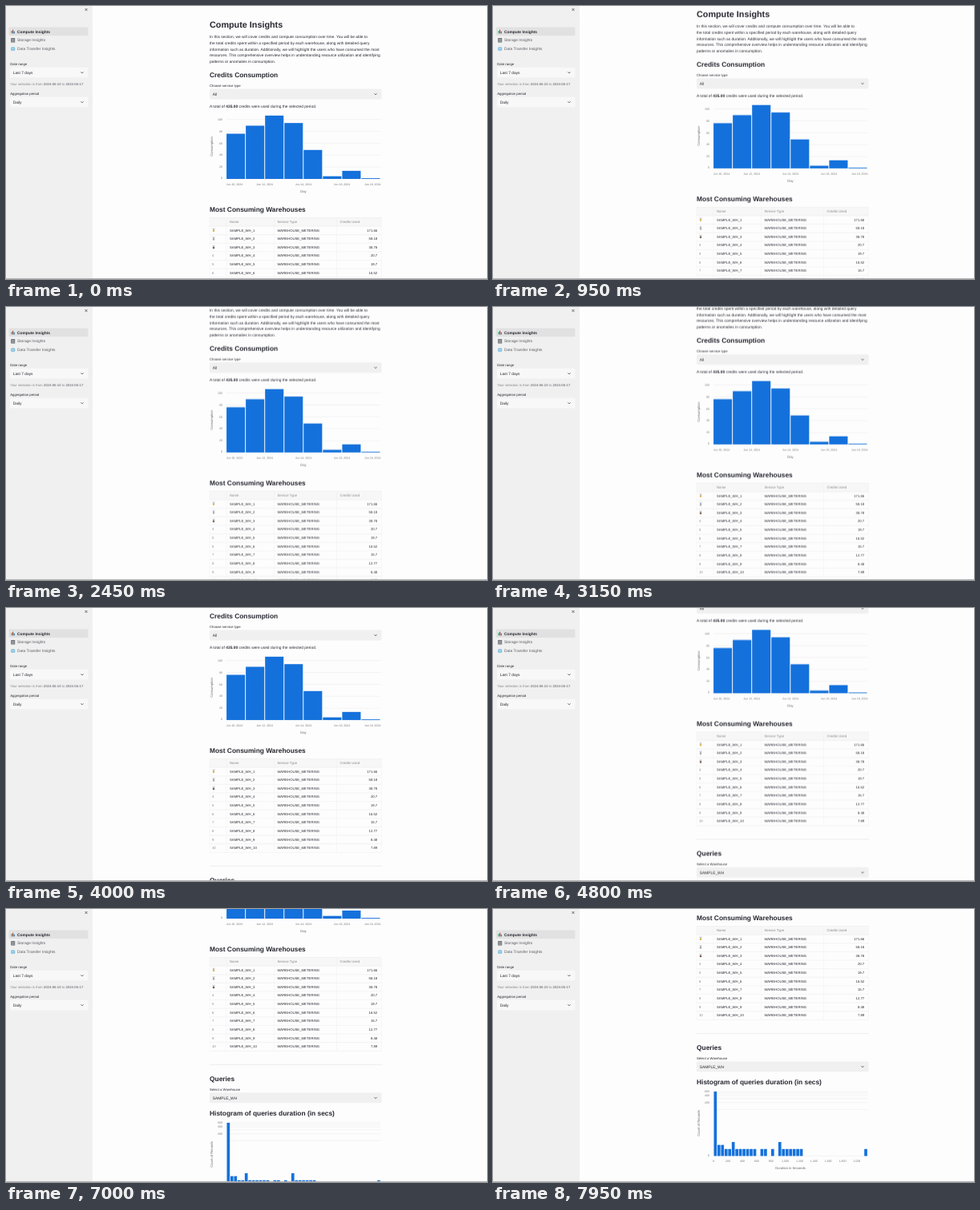
Write an HTML page that moves like this. It is 600 px wide and 341 px high and loops after 8000 ms.

```html
<!DOCTYPE html>
<html lang="en">
<head>
<meta charset="utf-8">
<title>Compute Insights</title>
<style>
  html, body { margin: 0; width: 100%; height: 100%; overflow: hidden; background: #fdfdfd; }
  svg { display: block; width: 600px; height: 341px; }
  text {
    font-family: "Liberation Sans", Arial, sans-serif;
    font-size: 4.86px; fill: #262730; text-rendering: geometricPrecision;
  }
  .h1 { font-size: 10.8px; font-weight: bold; }
  .h2 { font-size: 8.4px; font-weight: bold; }
  .label { font-size: 4.25px; }
  .tick { font-size: 3.55px; fill: #777; }
  .axis { font-size: 4.2px; fill: #666; }
  .muted { font-size: 4.25px; fill: #85868c; }
  .nav { fill: #5c5d64; }
  .bold { font-weight: bold; }
  .end { text-anchor: end; }
  .mid { text-anchor: middle; }

  /* The page advances once every 50 ms. */
  #page { animation: scroll 8s infinite; }
  @keyframes scroll {
    0%      { transform: translateY(0); animation-timing-function: steps(37); }
    23.125% { transform: translateY(-25.7px); animation-timing-function: steps(26); }
    39.375% { transform: translateY(-44.4px); animation-timing-function: steps(16); }
    49.375% { transform: translateY(-74px); animation-timing-function: steps(17); }
    60%     { transform: translateY(-109.6px); animation-timing-function: steps(22); }
    73.75%  { transform: translateY(-164.7px); animation-timing-function: steps(22); }
    87.5%   { transform: translateY(-204px); animation-timing-function: steps(19); }
    99.375%, 100% { transform: translateY(-243px); }
  }
</style>
</head>
<body>
<svg viewBox="0 0 600 341">
  <rect width="600" height="341" fill="#fdfdfd"/>
  <g id="page"></g>
  <g id="sidebar"></g>
  <rect y="340" width="600" height="1" fill="#b4b4b4"/>
</svg>
<script>
const BLUE = '#1471db', GRID = '#e6e6e6', FIELD = '#f0f0f0';

const text = (x, y, value, cls = '', extra = '') =>
  `<text x="${x}" y="${y}" class="${cls}" ${extra}>${value}</text>`;
const rect = (x, y, w, h, fill, rx = 0) =>
  `<rect x="${x}" y="${y}" width="${w}" height="${h}" fill="${fill}" rx="${rx}"/>`;
const line = (x1, y1, x2, y2, color = GRID, width = 0.4) =>
  `<path d="M${x1} ${y1}L${x2} ${y2}" stroke="${color}" stroke-width="${width}"/>`;
const rotated = (x, y, value) =>
  text(0, 0, value, 'axis mid', `transform="translate(${x} ${y}) rotate(-90)"`);
const select = (x, y, w, value, fill) =>
  rect(x, y, w, 12.8, fill, 1.6) + text(x + 3.7, y + 8.2, value) +
  `<path d="M${x + w - 9} ${y + 5.7}l1.5 1.5l1.5-1.5" fill="none" stroke="#31333f" stroke-width=".8"/>`;

function intro() {
  const lines = [
    'In this section, we will cover credits and compute consumption over time. You will be able to see',
    'the total credits spent within a specified period by each warehouse, along with detailed query',
    'information such as duration. Additionally, we will highlight the users who have consumed the most',
    'resources. This comprehensive overview helps in understanding resource utilization and identifying',
    'patterns or anomalies in consumption.'
  ];
  lines[0] = lines[0].replace(' see', '');
  lines[1] = lines[1].replace(/^/, '');
  return text(254, 26.8, 'Compute Insights', 'h1') +
    lines.map((s, i) => text(254, 40 + i * 7.75, s)).join('') +
    text(254, 89, 'Credits Consumption', 'h2') +
    text(254, 101, 'Choose service type', 'label') +
    select(254, 103.6, 214.5, 'All', FIELD) +
    text(254, 126.8, 'A total of <tspan class="bold">435.00</tspan> credits were used during the selected period.');
}

function consumptionChart() {
  const base = 216, unit = 0.743, left = 274.7, pitch = 24.05;
  const days = [76, 89.5, 106.5, 94, 48.7, 4.5, 13.6, 1.2];
  let out = '';
  for (let v = 0; v <= 100; v += 20) {
    const y = base - v * unit;
    out += line(left, y, 467.5, y) + text(270, y + (v ? 1.2 : 0.4), v, 'tick end');
  }
  days.forEach((v, i) => {
    out += rect(left + i * pitch + 0.4, base - v * unit, pitch - 1, v * unit, BLUE);
  });
  for (let i = 0; i < 5; i++) {
    const x = i === 4 ? 467.5 : left + i * 2 * pitch;
    out += text(x, 223.9, `Jun ${10 + i * 2}, 2024`, 'tick ' + ['', 'mid', 'mid', 'mid', 'end'][i]);
  }
  return out + text(371, 233, 'Day', 'axis mid') + rotated(258.3, 175.5, 'Consumption');
}

function medal(y, color) {
  return `<path d="M257.8 ${y - 2.4}l1.2 2l1.2-2" fill="none" stroke="#8d96a3" stroke-width=".7"/>` +
    `<circle cx="259" cy="${y + 0.8}" r="1.3" fill="${color}"/>`;
}

function warehouses() {
  const used = [171.66, 58.18, 38.78, 20.7, 19.7, 16.52, 15.7, 12.77, 8.48, 7.89];
  const medals = ['#dfb04a', '#a9adb3', '#77604f'];
  const top = 264.5, row = 10.62, bottom = top + row * 11;
  let out = text(254, 257, 'Most Consuming Warehouses', 'h2') +
    rect(254, top, 214.5, row, '#f7f7f7') +
    text(279, 271, 'Name', 'muted') + text(338.5, 271, 'Service Type', 'muted') +
    text(416.5, 271, 'Credits Used', 'muted');
  for (let i = 0; i <= 11; i++) out += line(254, top + i * row, 468.5, top + i * row);
  for (const x of [254, 275, 334.5, 412.5, 468.5]) out += line(x, top, x, bottom, '#eeeeee');
  used.forEach((v, i) => {
    const y = 280 + i * row, base = y + 1.6;
    out += (medals[i] ? medal(y, medals[i]) : text(257, base, i + 1, 'muted')) +
      text(279, base, `SAMPLE_WH_${i + 1}`, 'label') +
      text(338.5, base, 'WAREHOUSE_METERING', 'label') +
      text(463.2, base, v, 'label end');
  });
  return out + line(254, 398.5, 469, 398.5, '#dedede', 0.5);
}

function queries() {
  const base = 551.5, left = 275.2, bin = 4.468;
  const height = v => 12.58 * Math.log(1 + v);
  const counts = [...'0221131111110110103111111010'].map(Number);
  counts[0] = 600;
  counts[26] = 0;
  counts[42] = 1;
  let out = text(254, 419, 'Queries', 'h2') +
    text(254, 430.8, 'Select a Warehouse', 'label') +
    select(254, 433.5, 214.5, 'SAMPLE_WH', FIELD) +
    text(254, 461.5, 'Histogram of queries duration (in secs)', 'h2');
  for (let v = 0; v <= 600; v += 100) {
    const y = base - height(v);
    out += line(left, y, 467.5, y);
    if (v % 200 === 0) out += text(270, y + (v ? 1.2 : 0), v, 'tick end');
  }
  counts.forEach((v, i) => {
    if (v) out += rect(left + i * bin + 0.3, base - height(v), bin - 0.8, height(v), BLUE);
  });
  for (let v = 0; v <= 2000; v += 200)
    out += text(left + v / 50 * bin, 558.9, v.toLocaleString('en-US'), 'tick mid');
  return out + text(371, 568, 'Duration in Seconds', 'axis mid') + rotated(258.3, 510.5, 'Count of Records');
}

function sidebar() {
  const chartIcon = rect(6, 29.2, 5.4, 5.4, '#e9eef0') + rect(6.5, 30.8, 1.2, 3.6, '#3d9a57') +
    rect(8.1, 29.6, 1.2, 4.8, '#b5483f') + rect(9.7, 31.6, 1.2, 2.8, '#2f6fb0');
  const cabinetIcon = rect(6.2, 40, 5, 5.4, '#63676c', 0.5) +
    rect(6.8, 40.9, 3.8, 1.5, '#a5a9ad') + rect(6.8, 43.1, 3.8, 1.5, '#a5a9ad');
  const globeIcon = '<circle cx="8.7" cy="53.5" r="2.6" fill="#58a9d4"/>' +
    '<path d="M6.1 53.5h5.2M8.7 50.9v5.2" stroke="#d7edf6" stroke-width=".5"/>' +
    '<ellipse cx="8.7" cy="53.5" rx="1.3" ry="2.6" fill="none" stroke="#d7edf6" stroke-width=".5"/>';
  return rect(0, 0, 108, 341, FIELD) +
    '<path d="M98.5 3l3 3m0-3l-3 3" stroke="#3a3b44" stroke-width=".7"/>' +
    rect(3.5, 26.5, 99, 10.6, '#e1e1e1', 1.4) + chartIcon + cabinetIcon + globeIcon +
    text(14, 33.5, 'Compute Insights', 'bold') +
    text(14, 44.4, 'Storage Insights', 'nav') +
    text(14, 55.2, 'Data Transfer Insights', 'nav') +
    text(5.2, 73.5, 'Date range', 'label') +
    select(5, 76.7, 97.5, 'Last 7 days', '#f8f8f8') +
    text(5.2, 98.8, 'Your selection is from <tspan class="bold">2024-06-10</tspan> to <tspan class="bold">2024-06-17</tspan>', 'muted') +
    text(5.2, 110.8, 'Aggregation period', 'label') +
    select(5, 113.6, 97.5, 'Daily', '#f8f8f8');
}

document.getElementById('page').innerHTML = intro() + consumptionChart() + warehouses() + queries();
document.getElementById('sidebar').innerHTML = sidebar();
</script>
</body>
</html>
```
